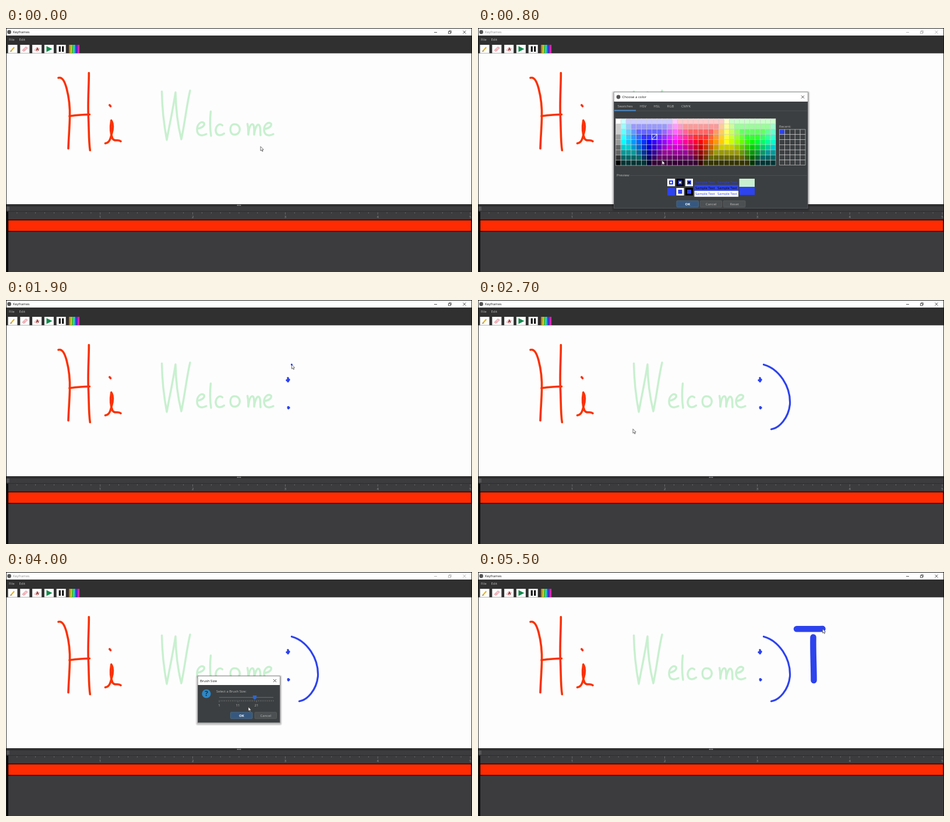
An HTML page that plays this animation: 800x421 px, repeating every 5.6 s.

```html
<!DOCTYPE html>
<html lang="en">
<head>
<meta charset="utf-8">
<title>Keyframes</title>
<style>
  html, body { margin: 0; width: 100%; height: 100%; overflow: hidden; background: #3c3c3f; }
  svg { display: block; width: 100vw; height: 100vh; }
  text { font-family: "Open Sans", "Noto Sans", sans-serif; font-size: 6px; fill: #bbb; }
  .mid { text-anchor: middle; }
  .ink { fill: none; stroke-linecap: round; stroke-linejoin: round; }
</style>
</head>
<body>
<svg id="stage" viewBox="0 0 800 421"></svg>
<script>
const LOOP = 5600, STEP = 100;
const RED = '#fb3104', MINT = '#c8f0cf', BLUE = '#2d43ee', DARK = '#3c3f41';
const stage = document.getElementById('stage');

function add(parent, tag, attrs = {}, content) {
  const el = document.createElementNS('http://www.w3.org/2000/svg', tag);
  for (const k in attrs) el.setAttribute(k, attrs[k]);
  if (content !== undefined) el.textContent = content;
  parent.appendChild(el);
  return el;
}
const group = (p, attrs) => add(p, 'g', attrs);
const rect = (p, x, y, width, height, fill, extra) =>
  add(p, 'rect', { x, y, width, height, fill, ...extra });
const path = (p, d, attrs) => add(p, 'path', { d, fill: 'none', ...attrs });
const label = (p, x, y, str, extra) => add(p, 'text', { x, y, ...extra }, str);
const ink = (p, d, stroke, width) =>
  path(p, d, { class: 'ink', stroke, 'stroke-width': width });
const show = (el, on) => el.setAttribute('visibility', on ? 'visible' : 'hidden');
const appIcon = (p, x, y) => add(p, 'circle', { cx: x, cy: y, r: 3.4, fill: '#555' });

// Main window
function titleBar() {
  rect(stage, 0, 0, 800, 14, '#fff');
  appIcon(stage, 5.5, 7);
  const bar = group(stage, { stroke: '#111', 'stroke-width': .7 });
  const name = label(bar, 12, 9.3, 'Keyframes', { stroke: 'none', style: 'font-size:5.8px' });
  path(bar, 'M735 7.5h5M759.5 6.2h3.6v3.6h-3.6zM760.6 6v-1.2h3.6v3.7h-1M784.5 4.7l5 5m0-5l-5 5');
  return active => {
    bar.setAttribute('stroke', active ? '#111' : '#999');
    name.style.fill = active ? '#111' : '#8d8d8d';
  };
}

function toolbar() {
  rect(stage, 0, 13, 800, 31, '#303031');
  label(stage, 5, 22.4, 'File');
  label(stage, 22.5, 22.4, 'Edit');
  const bar = group(stage);
  for (let i = 0; i < 5; i++) rect(bar, 3.5 + 20.8 * i, 29, 16, 14.5, '#fdfdfd');
  path(bar, 'M8.6 39.6l5.6-6.4', { stroke: '#e8b21c', 'stroke-width': 2.2 });
  path(bar, 'M7.5 41l.6-2 1.4 1.2z', { fill: '#333' });
  path(bar, 'M28 38.5l6-6 3 2-6 6zM30 36.5l3 2.2', { fill: '#f6c5cb', stroke: '#d9848f', 'stroke-width': .8 });
  path(bar, 'M48.5 38.5l4-5 5.5 2-4 5.5z', { fill: '#f8d3d6', stroke: '#e6a9ae', 'stroke-width': .6 });
  label(bar, 53.8, 38.6, 'A', { class: 'mid', style: 'fill:#7d1717;font-weight:700;font-size:7px' });
  path(bar, 'M69.5 31.3l10 5-10 5z', { fill: '#118a4c' });
  path(bar, 'M92.3 31.5v9.5M97.7 31.5v9.5', { stroke: '#111', 'stroke-width': 3.2 });
  for (let i = 0; i < 9; i++)
    rect(bar, 108 + i * 2, 29, 2.05, 14.5, `hsl(${(20 + i * 38) % 360} 75% 52%)`);
  path(bar, 'M111 29l-1 14M115 29l-1 14M119 29l-1 14M123 29l-1 14', { stroke: '#222', 'stroke-width': .6, opacity: .6 });
}

function timeline() {
  rect(stage, 0, 304, 800, 117, '#3c3c3f');
  rect(stage, 0, 304, 800, 4, '#2f2f31');
  for (const x of [397.5, 400, 402.5]) add(stage, 'circle', { cx: x, cy: 306, r: .8, fill: '#ddd' });
  rect(stage, 0, 316.2, 800, .8, '#2b2b2d');
  rect(stage, 1, 308, 5, 7, '#555558');
  for (let i = 1; i <= 50; i++) {
    const x = 3 + i * 15.88, major = i % 10 === 0;
    rect(stage, x - .4, 318, .8, major ? 4 : 2, '#737376');
    if (major) label(stage, x, 327.8, i / 10, { class: 'mid', style: 'fill:#999' });
  }
  rect(stage, 3.5, 331.2, 795.5, 19.6, '#ff2b02', { stroke: '#080808', 'stroke-width': 1.2 });
  rect(stage, 1.2, 317, 2.6, 104, '#050505');
}

function lettering() {
  for (const d of [
    'M90 86C97 84 101 93 104 104C109 123 110 140 109.500 155C109 174 107.500 190 107 208',
    'M142.300 77.500C142.500 100 140 128 141.500 155C142.500 178 142 196 144.300 211',
    'M109 152C120 150.500 132 149 143.500 149.200',
    'M177.800 133l1.800 2',
    'M170.500 199C179 198 180 188 183 176C184.500 167 182 161 180.800 159.500C179 170 179.500 183 183 191C187 197 191 191 197 195.500'
  ]) ink(stage, d, RED, 3.6);
  for (const d of [
    'M267.500 109.500C268 138 271 166 276 193C281 166 287 138 291 111C291.500 140 295 168 301 192C307 164 310 134 316 108',
    'M328 174C335 173 342 169 340 164C336 160 328 165 328 175C328 186 336 187 344 183',
    'M351.500 144C350 158 350 172 352 186',
    'M371.500 168C366 163 360 170 360 177C361 187 369 186 374.500 182',
    'M392 166C383 166 383 184 392 184C404 184 405 166 392 166',
    'M414.500 165.500C416 171 416 178 416 184C417 175 419 166 423 166C427 167 426 177 426 184C427 174 431 165 434 167C438 170 436 178 437 185',
    'M443 174C451 174 457 169 455 165C450 161 443 167 443 175C443 186 452 187 459 183'
  ]) ink(stage, d, MINT, 3.5);
}

// Strokes drawn over time; the pointer rides on each one.
const makeStroke = (d, width, from, to) => {
  const el = ink(stage, d, BLUE, width);
  return { el, from, to, len: el.getTotalLength() };
};

// Dialog helpers
function dialog(x, y, w, h, title, titleX, titleH) {
  const g = group(stage, { visibility: 'hidden' });
  for (let i = 4; i > 0; i--)
    rect(g, x - i, y - i + 1.5, w + 2 * i, h + 2 * i, '#000', { rx: i, opacity: .08 });
  rect(g, x, y, w, h, DARK, { stroke: '#55585a', 'stroke-width': 1 });
  rect(g, x, y, w, titleH, '#fff');
  label(g, titleX, y + titleH / 2 + 2.3, title, { style: 'fill:#111' });
  path(g, `M${x + w - 11} ${y + titleH / 2 - 2.500}l5 5m0-5l-5 5`, { stroke: '#222', 'stroke-width': .8 });
  return g;
}
function button(p, x, y, str, primary) {
  rect(p, x, y, 37.5, 11, primary ? '#365880' : '#4c5052',
    { rx: 1.2, stroke: primary ? '#4c708c' : '#5e6060', 'stroke-width': .8 });
  label(p, x + 18.8, y + 7.6, str,
    { class: 'mid', style: primary ? 'fill:#fff;font-weight:700' : '' });
}

function swatch(col, row) {
  if (!col) return `rgb(${[255, 204, 204, 153, 153, 102, 102, 51, 0].map(v => [v, v, v])[row]})`;
  const k = (col - 1) % 10, sector = Math.floor((col - 1) / 10);
  const low = Math.max(0, 204 - 51 * row), high = Math.min(255, 459 - 51 * row);
  const fit = v => Math.min(high, Math.max(low, v));
  const fall = fit(51 * (5 - k)), rise = fit(51 * (k - 5));
  return `rgb(${[[rise, fall, high], [high, rise, fall], [fall, high, rise]][sector]})`;
}

function colorDialog() {
  const g = dialog(233.5, 111, 332.5, 200, 'Choose a color', 247.5, 16);
  appIcon(g, 241, 119);
  [['Swatches', 252.5], ['HSV', 283.5], ['HSL', 307], ['RGB', 330.5], ['CMYK', 357]]
    .forEach(([str, x]) => label(g, x, 137.2, str, { class: 'mid' }));
  rect(g, 234, 142.6, 332, .7, '#55585a');
  rect(g, 234, 141.3, 37, 2, '#4a88c7');

  const cw = 8.86, ch = 8.95, left = 236.3, top = 156.5;
  for (let r = 0; r < 9; r++)
    for (let c = 0; c < 31; c++)
      rect(g, left + c * cw, top + r * ch, cw, ch, swatch(c, r),
        { stroke: '#d8d8d8', 'stroke-width': .55 });
  const mark = path(g, `M${left + 7 * cw} ${top + 3 * ch}h${cw}v${ch}h${-cw}zm0 ${ch}l${cw} ${-ch}`,
    { stroke: '#fff', 'stroke-width': .9 });

  label(g, 517, 171.5, 'Recent:');
  const recent = [];
  for (let i = 0; i < 35; i++)
    recent.push(rect(g, 517.5 + i % 5 * 8.9, 175 + Math.floor(i / 5) * 8.8, 8.9, 8.8, DARK,
      { stroke: '#d8d8d8', 'stroke-width': .6 }));

  label(g, 238, 256.3, 'Preview');
  rect(g, 261, 254, 304, .6, '#55585a');
  const tint = 'var(--pick)', W = '#fff', K = '#000';
  const box = (x, y, ...fills) => fills.forEach((fill, i) => {
    const inset = [0, 3, 5][i];
    rect(g, x + inset, y + inset, 13 - 2 * inset, 13 - 2 * inset, '', { style: `fill:${fill}` });
  });
  box(325, 260, W, tint, W);
  box(340.5, 260, K, tint, W);
  box(356, 260, W, tint, K);
  box(325, 276, tint);
  box(340.5, 276, W, tint);
  box(356, 276, K, tint);
  [[DARK, tint], [tint, K], [W, tint]].forEach(([back, fore], i) => {
    const y = 260.3 + i * 10.3;
    rect(g, 371.5, y, 75.5, 10.3, '', { style: `fill:${back}` });
    for (const x of [373, 411]) label(g, x, y + 7.3, 'Sample Text', { style: `fill:${fore}` });
  });
  rect(g, 448.5, 260, 26.500, 14, MINT);
  rect(g, 448.5, 274, 26.500, 14, '', { style: `fill:${tint}` });
  ['OK', 'Cancel', 'Reset'].forEach((str, i) => button(g, 341 + i * 40.2, 298, str, !i));

  return (open, picked) => {
    show(g, open);
    show(mark, open && picked);
    g.style.setProperty('--pick', picked ? BLUE : MINT);
    recent[0].setAttribute('fill', picked ? BLUE : DARK);
  };
}

function brushDialog() {
  const g = dialog(329.5, 180, 140.5, 79.500, 'Brush Size', 333, 15);
  add(g, 'circle', { cx: 344, cy: 210, r: 7.6, fill: '#2d87c6' });
  label(g, 344, 214.4, '?', { class: 'mid', style: 'fill:#23343f;font-weight:700;font-size:12px' });
  label(g, 361, 208, 'Select a Brush Size:', { style: 'font-size:5.8px' });
  rect(g, 366, 215.8, 93, 1.2, '#65686a');
  for (let i = 0; i < 30; i++) {
    rect(g, 365.7 + i * 3.2, 221.3, .7, i % 10 ? 2 : 3.3, '#8b8d8e');
    if (i % 10 === 0) label(g, 366 + i * 3.2, 232, i + 1, { class: 'mid' });
  }
  const thumb = path(g, 'M-3.2 213h6.4v4.500l-3.2 3-3.2-3z', { fill: '#2f65ca' });
  button(g, 385.5, 242, 'OK', true);
  button(g, 427, 242, 'Cancel');
  return (open, x) => {
    show(g, open);
    thumb.setAttribute('transform', `translate(${x} 0)`);
  };
}

// Value along a list of [time, ...values]
function track(keys, t) {
  const i = keys.findIndex(k => k[0] > t);
  if (i < 0) return keys[keys.length - 1].slice(1);
  if (!i) return keys[0].slice(1);
  const a = keys[i - 1], b = keys[i], u = (t - a[0]) / (b[0] - a[0]);
  return a.slice(1).map((v, j) => v + (b[j + 1] - v) * u);
}

const setActive = titleBar();
toolbar();
rect(stage, 0, 43.7, 800, 260.5, '#fefdfe');
lettering();
const strokes = [
  makeStroke('M484 134.500l.5 4-2.500 0 4-1-2 3', 3.4, 1300, 1500),
  makeStroke('M484.500 185l1.200 .8-1 .8', 4, 1600, 1700),
  makeStroke('M490.500 111.500C517 119 537 149 535.500 180C533 204 517 221 503.500 223', 3.2, 1900, 2300),
  makeStroke('M575.500 112.500C575 138 576.500 162 576.500 187', 10.5, 4400, 4900),
  makeStroke('M547 98.300C562 98.300 577 98.500 591.500 98', 10.5, 5100, 5500)
];
timeline();
path(stage, 'M0 .5H800M.4 0V421M799.6 0V421', { stroke: '#0a0a0a', 'stroke-width': .9 });
const setColors = colorDialog();
const setBrush = brushDialog();
const pointer = path(stage, 'M0 0v7.300l1.700-1.500 1.200 2.700 1.200-.5-1.200-2.600h2.300z',
  { fill: '#fff', stroke: '#333', 'stroke-width': .7 });

const pointerKeys = [
  [0, 437, 204.5], [300, 117, 37], [400, 117, 37], [600, 303, 188], [700, 303, 188],
  [800, 316, 228.5], [900, 360, 303], [950, 360, 303], [1100, 449, 186.5], [1300, 484, 134],
  [1500, 484, 141], [1600, 484.5, 185], [1700, 485, 187], [1900, 490, 111], [2300, 503, 223],
  [2400, 490, 225], [2700, 266, 222.5], [3000, 11, 37], [3100, 60, 70], [3300, 380, 217.5],
  [3400, 380, 217.5], [3900, 428, 217.5], [4100, 404, 248], [4200, 404, 248], [4400, 575, 112],
  [4900, 577, 187], [5100, 547, 98], [5500, 592, 98]
];
const thumbKeys = [[3400, 378.5], [3900, 427]];

function render(t) {
  const choosing = t >= 500 && t < 1000, sizing = t >= 3100 && t < 4300;
  setActive(!choosing && !sizing);
  setColors(choosing, t >= 700);
  setBrush(sizing, track(thumbKeys, t)[0]);

  let [x, y] = track(pointerKeys, t);
  for (const { el, from, to, len } of strokes) {
    const p = Math.min(1, Math.max(0, (t - from) / (to - from)));
    show(el, t >= from);
    el.setAttribute('stroke-dasharray', p < 1 ? `${Math.max(.01, p * len)} ${len + 20}` : 'none');
    if (t >= from && t <= to) {
      const tip = el.getPointAtLength(p * len);
      x = tip.x;
      y = tip.y + (to === 4900 ? 2.5 : 0);
    }
  }
  pointer.setAttribute('transform', `translate(${x} ${y})`);
}

const start = performance.now();
function frame(now) {
  const t = Math.max(0, now - start) % LOOP;
  render(Math.floor(t / STEP) * STEP);
  requestAnimationFrame(frame);
}
render(0);
requestAnimationFrame(frame);
</script>
</body>
</html>
```
